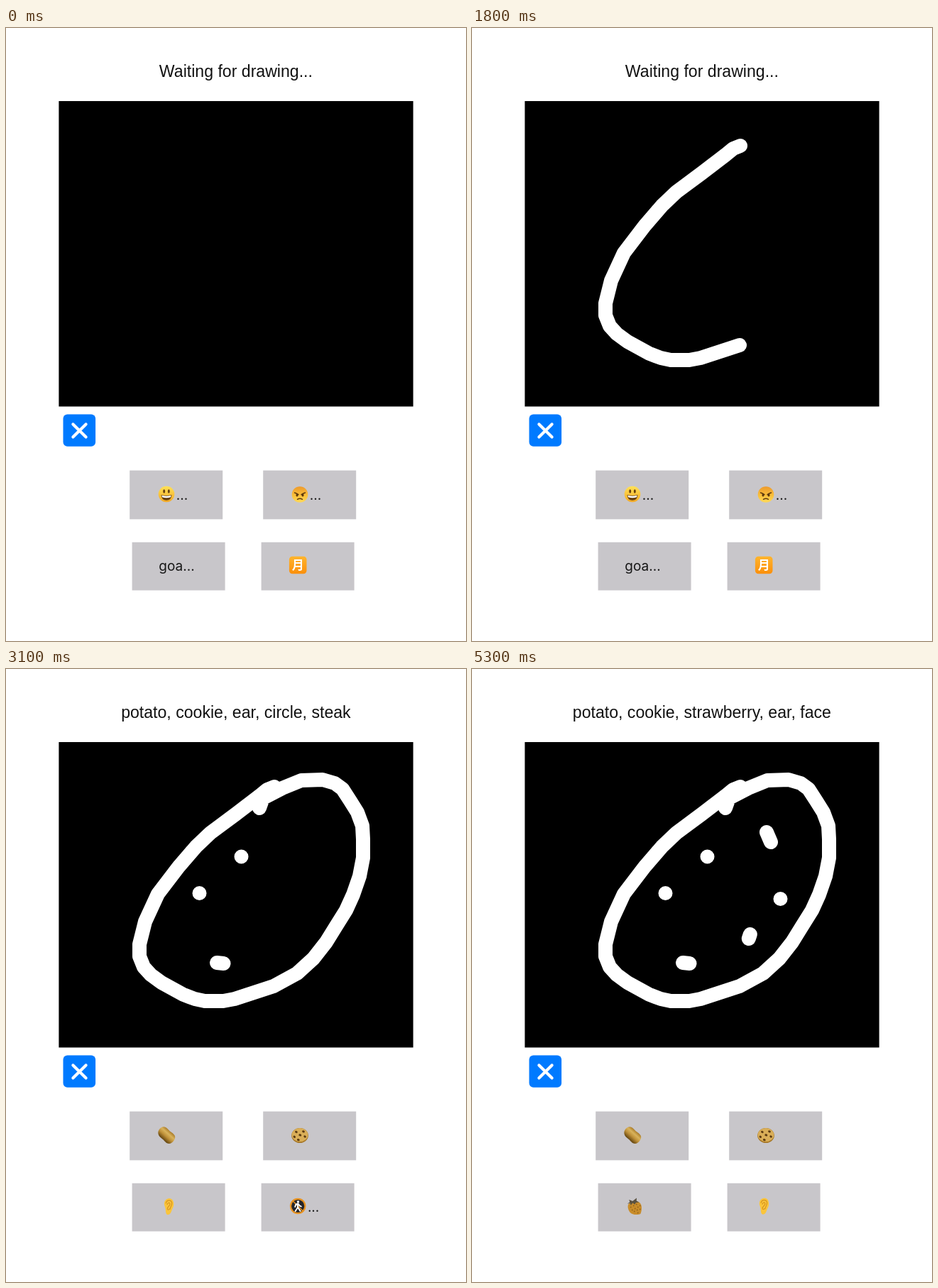
An HTML page for the animation above (5.4 s loop, 648x864 px).

```html
<!DOCTYPE html>
<html lang="en">
<head>
<meta charset="utf-8">
<title>Drawing classifier</title>
<style>
html, body { margin: 0; width: 100%; height: 100%; overflow: hidden; background: #fff; }
svg { display: block; width: 648px; height: 864px; }
#title { font: 23.1px "Liberation Sans", Arial, sans-serif; text-anchor: middle; fill: #111; }
.label { font: 19px Inter, Roboto, sans-serif; fill: #161616; }
.kanji { font: 700 17px "Noto Sans CJK JP", "Noto Sans CJK", sans-serif; text-anchor: middle; fill: #fff; }
#ink { fill: none; stroke: #fff; stroke-width: 20; stroke-linecap: round; stroke-linejoin: round; }
</style>
</head>
<body>
<svg viewBox="0 0 648 864">
  <defs>
    <linearGradient id="sun" x2="0" y2="1"><stop stop-color="#ffe257"/><stop offset="1" stop-color="#f3a925"/></linearGradient>
    <linearGradient id="mad" x2="0" y2="1"><stop stop-color="#ee9a2b"/><stop offset=".6" stop-color="#f9c23c"/><stop offset="1" stop-color="#ffd95a"/></linearGradient>
    <linearGradient id="tile" x2="0" y2="1"><stop stop-color="#ffb52e"/><stop offset="1" stop-color="#fb8f0b"/></linearGradient>
    <linearGradient id="spud" x2="0" y2="1"><stop stop-color="#a87a28"/><stop offset=".3" stop-color="#d9b35c"/><stop offset=".6" stop-color="#bd8f38"/><stop offset="1" stop-color="#5f410d"/></linearGradient>
    <radialGradient id="flesh"><stop stop-color="#b9b4a8"/><stop offset=".65" stop-color="#cbc3b0"/><stop offset="1" stop-color="#c9a864"/></radialGradient>

    <g id="smile">
      <circle r="11.3" fill="url(#sun)"/>
      <ellipse cx="-3.3" cy="-4" rx="1.5" ry="2.8" fill="#67400f"/>
      <ellipse cx="3.3" cy="-4" rx="1.5" ry="2.8" fill="#67400f"/>
      <path d="M-7.5 1Q0 3.2 7.5 1Q7 8.7 0 8.7T-7.5 1Z" fill="#67400f"/>
      <path d="M-6.6 1.8Q0 3.8 6.6 1.8L6 4.3Q0 6 -6 4.3Z" fill="#fff"/>
    </g>
    <g id="angry">
      <circle r="11.3" fill="url(#mad)"/>
      <ellipse cx="-4" cy="1" rx="1.5" ry="2" fill="#5d390e"/>
      <ellipse cx="4" cy="1" rx="1.5" ry="2" fill="#5d390e"/>
      <path d="M-7.5 -2.5Q-5 -1.7 -2 .2M7.5 -2.5Q5 -1.7 2 .2M-3.5 6.8Q0 4.6 3.5 6.8" fill="none" stroke="#5d390e" stroke-width="1.4" stroke-linecap="round"/>
    </g>
    <g id="month">
      <rect x="-12.3" y="-12.3" width="24.6" height="24.6" rx="4.5" fill="url(#tile)"/>
      <text class="kanji" y="6.2">月</text>
    </g>
    <g id="potato" transform="rotate(42)">
      <path d="M-13 0C-13.3 -6.5 -8.5 -8.4 -3.5 -7.6S4.5 -8.8 9 -7.4S14.5 3.2 11 6.4S3 7.2 -2 7.9S-12.7 6.5 -13 0Z" fill="url(#spud)"/>
    </g>
    <g id="cookie">
      <ellipse rx="11.8" ry="10.6" fill="#a67625"/>
      <ellipse cy="-.8" rx="11.3" ry="9.6" fill="#d9ae58"/>
      <path d="M-5.5 -5.2l.8 .4M4.6 -5.8l.8 .4M-8 1.6l.6 .5M-.2 -.8l1 .4M6.8 1.4l.6 .4M-2.6 6l.9 .3" stroke="#5b3a12" stroke-width="2.9" stroke-linecap="round"/>
    </g>
    <g id="nowalk">
      <circle r="10.2" fill="#25262a" stroke="#e99321" stroke-width="2.2"/>
      <path d="M-7 -7L7 7" stroke="#e99321" stroke-width="1.5"/>
      <circle cx=".3" cy="-6" r="1.7" fill="#fff"/>
      <path d="M0 -3.5L-.3 2L-3.6 7.2M-.3 1.5L3.4 7M-4 1L-2.8 -2.5L.2 -3.4L2.6 -.4L4.6 .5" fill="none" stroke="#fff" stroke-width="1.9" stroke-linecap="round" stroke-linejoin="round"/>
    </g>
    <g id="pear">
      <path d="M-9.5 -10Q-5 -12 -1 -7.8C2 -5.4 9.5 -3.6 10.2 3C10.7 9 4.5 11.2 0 10.4C-6 9.2 -7.2 4.5 -7.7 0C-8.2 -3 -10 -6 -9.5 -10Z" fill="url(#flesh)" stroke="#b99646" stroke-width=".9"/>
      <path d="M-8.5 -9L-10.5 -12" stroke="#8d6a2c" stroke-width="1.3"/>
      <path d="M0 0h.8M4 2h.8M1 5h.8M-3 3h.8M5 6h.8" stroke="#8f897d"/>
    </g>
    <g id="ear">
      <path d="M-6.4 -4C-6 -10 -1 -12 3 -10.8C7.4 -9.2 7.9 -2 5.6 2.3C3.7 5.5 3.2 11.7 -1.3 11.7C-4.8 11.5 -4 6 -4.8 2.5C-5.2 0 -6.6 -1.5 -6.4 -4Z" fill="#fac53c"/>
      <path d="M-4 -4.5C-3.2 -9.5 3.6 -9.9 4.4 -5C4.8 -1.5 2 .5 1.7 4M-2.3 -2.7C-.9 -6.3 2.3 -5.8 1.5 -2.5C1 -.5 -2.4 .7 -2 3.5C-1.8 5.2 .3 5.1 .6 3.5" fill="none" stroke="#d8951f" stroke-width="1.2" stroke-linecap="round"/>
    </g>
    <g id="berry">
      <path d="M-9 -3C-6 -7 1 -9 6 -6C11 -3 10 6 8 10.6C4 12.4 -4 12 -7 8C-9.5 4.5 -10.5 0 -9 -3Z" fill="#c88c2a"/>
      <path d="M-6 1h1M-2 -1h1M2 -3h1M-4 5h1M0 3h1M4 1h1M-1 7h1M3 5h1M7 4h1M4 9h1M7 -1h1" stroke="#704711" stroke-width="1.4"/>
      <path d="M-10.5 -4L-7 -6L-8 -9.4L-3 -7.6L2.7 -12L2.4 -8L6 -5.4L1.6 -5.6L0 -2.8L-3 -5L-5.6 -1.6L-6.4 -4.4Z" fill="#5a5140"/>
    </g>
  </defs>

  <rect width="648" height="864" fill="#fff"/>
  <text id="title" x="323.9" y="69.2"></text>
  <rect x="74.4" y="103" width="499.2" height="430.5"/>
  <path id="ink"/>
  <rect x="80.5" y="544.4" width="45.6" height="45.4" rx="6" fill="#007aff"/>
  <path d="M94.4 558.4L112.6 576.4M112.6 558.4L94.4 576.4" stroke="#fff" stroke-width="4.2" stroke-linecap="round"/>
  <g fill="#c8c6ca">
    <rect x="174.2" y="623.6" width="131" height="68.8"/>
    <rect x="362.2" y="623.6" width="131" height="68.8"/>
    <rect x="177.6" y="724.8" width="131" height="67.8"/>
    <rect x="359.6" y="724.8" width="131" height="67.8"/>
  </g>
  <g id="labels"></g>
</svg>
<script>
const LOOP = 5400, STEP = 100;
const $ = id => document.getElementById(id);

const outline = `378,166 368,170 357,179 323,205 288,231 268,250 243,279 214,317
  196,356 188,388 188,405 194,420 204,431 219,442 250,459 266,465 280,468 306,468
  322,465 377,447 410,429 433,408 451,385 464,364 479,340 489,318 498,292 503,266
  503,240 502,221 495,202 485,186 474,169 463,161 446,156 416,157 389,168 362,182
  357,196`.split(/\s+/);

// points drawn after each step, the first one at 900 ms
const reach = [1, 4, 5, 7, 8, 10, 12, 15, 18, 20, 26, 30, 35, 37, 39];

const spots = [
  [2600, "M331.5 264.5h0"],
  [2800, "M272.5 316h0"],
  [3100, "M297 414L306.5 415"],
  [3300, "M389.8 380L391.8 374"],
  [3700, "M434.5 324h0"],
  [4000, "M415 230L421 244"]
];

// time, title, the four button labels; "+" adds an ellipsis to an icon
const guesses = [
  [0, "Waiting for drawing...", "#smile+", "#angry+", "goa...", "#month"],
  [2400, "potato, hexagon, circle, pear, steak", "#potato", "hex...", "#nowalk+", "#pear"],
  [2700, "potato, cookie, pear, circle, steak", "#potato", "#cookie", "#pear", "#nowalk+"],
  [3100, "potato, cookie, ear, circle, steak", "#potato", "#cookie", "#ear", "#nowalk+"],
  [3800, "potato, cookie, ear, strawberry, face", "#potato", "#cookie", "#ear", "#berry"],
  [4200, "potato, cookie, strawberry, ear, face", "#potato", "#cookie", "#berry", "#ear"]
];
const slots = [[226, 657], [414, 657.5], [229.3, 757.5], [411.2, 757]];

function label(name, i) {
  const [x, y] = slots[i];
  const text = (str, dx) => `<text class="label" x="${x + dx}" y="${y + 7.7}">${str}</text>`;
  if (name[0] !== "#") return text(name, -14);
  const icon = `<use href="${name.replace("+", "")}" x="${x}" y="${y}"/>`;
  return name.endsWith("+") ? icon + text("...", 13.7) : icon;
}

function inkPath(t) {
  const i = Math.floor((t - 900) / STEP);
  if (i < 0) return "";
  const count = reach[Math.min(i, reach.length - 1)];
  const dots = spots.filter(s => t >= s[0]).map(s => s[1]);
  return "M" + outline[0] + "L" + outline.slice(0, count).join("L") + dots.join("");
}

let shown = -1;
function draw(now) {
  const t = Math.floor((now % LOOP) / STEP) * STEP;
  if (t !== shown) {
    shown = t;
    const [, title, ...names] = guesses.filter(g => t >= g[0]).pop();
    $("title").textContent = title;
    $("labels").innerHTML = names.map(label).join("");
    $("ink").setAttribute("d", inkPath(t));
  }
}

const start = performance.now();
function tick() {
  draw(performance.now() - start);
  requestAnimationFrame(tick);
}
tick();
</script>
</body>
</html>
```
